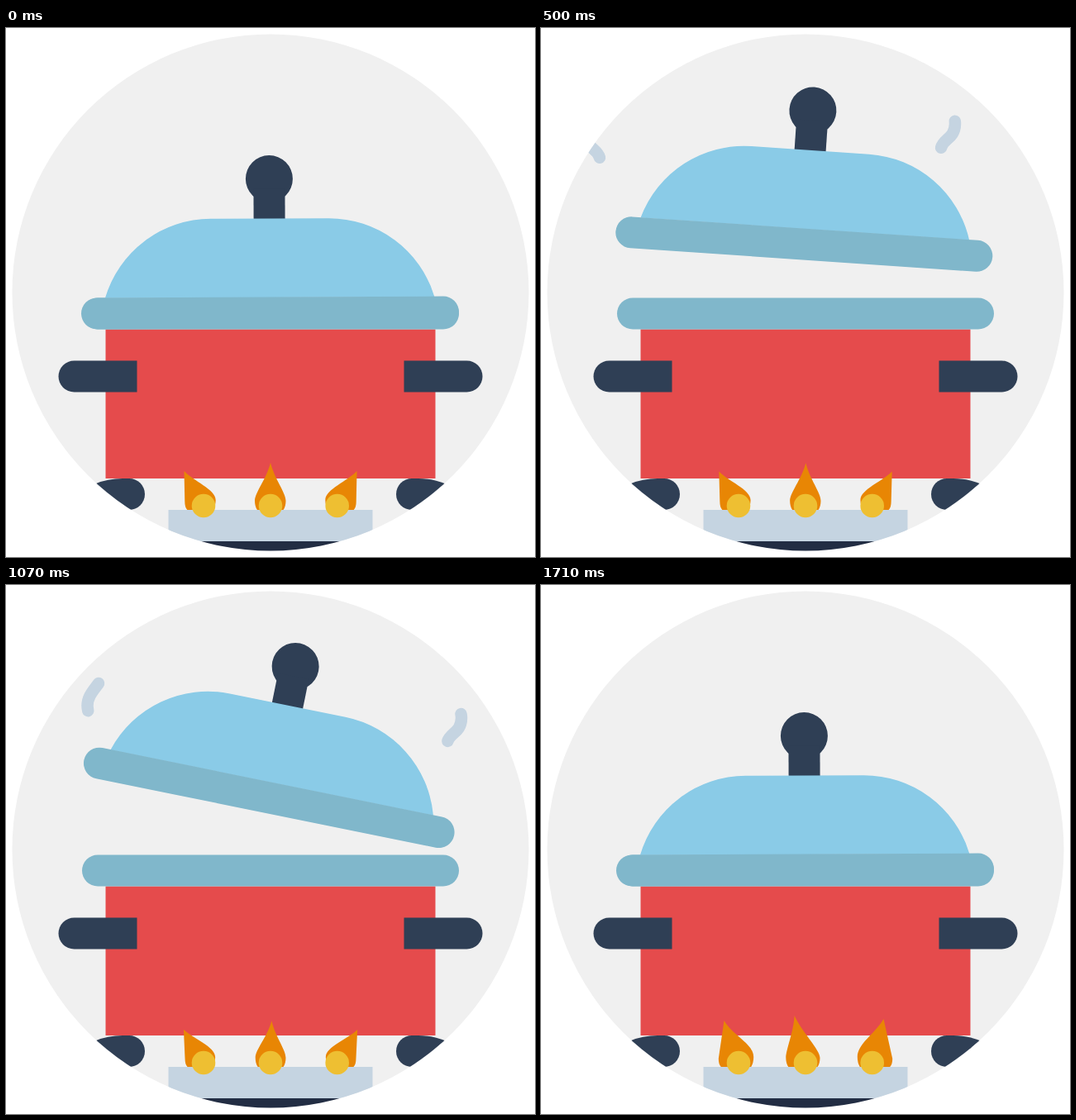
Recreate the animation shown at these times as an HTML page. Size 640x640 px, loop 1.78 s.

```html
<!DOCTYPE html>
<html lang="en">
<head>
<meta charset="utf-8">
<title>Boiling pot</title>
<style>
  html, body { margin: 0; height: 100%; overflow: hidden; background: #fff; }
  svg { display: block; width: 100vw; height: 100vh; }
  .navy { fill: #2f3f55; }
  .rim { fill: #80b7cb; }
  .flame { fill: #e88604; }
  .steam { fill: none; stroke: #c5d4e1; stroke-width: 14.5; stroke-linecap: round; }
</style>
</head>
<body>
<svg viewBox="0 0 640 640">
  <defs>
    <clipPath id="disc"><circle cx="320" cy="320" r="312.5"/></clipPath>
    <g id="side" class="navy">
      <path d="M158.5 402.5H82.5a19 19 0 0 0 0 38H158.5Z"/>
      <path d="M149 545H141Q123 545 108 551.5L95 583H149a19 19 0 0 0 0-38Z"/>
    </g>
  </defs>
  <g clip-path="url(#disc)">
    <rect width="640" height="640" fill="#f0f0f0"/>
    <g id="steam"></g>
    <path fill="#e54b4c" d="M120.5 364.5H519.5V545H120.5Z"/>
    <use href="#side"/>
    <use href="#side" transform="matrix(-1 0 0 1 640 0)"/>
    <rect class="rim" x="92" y="326.5" width="456" height="38" rx="19"/>
    <g id="lid">
      <circle class="navy" cx="-.4" cy="-162" r="28.5"/>
      <path class="navy" d="M-19.4-150H18.6V-113H-19.4Z"/>
      <path fill="#8acbe7" d="M-199.5-18.5A133.5 133.5 0 0 1-71.5-114H71A133.5 133.5 0 0 1 199-18.5Z"/>
      <rect class="rim" x="-228.5" y="-19" width="457" height="38" rx="19"/>
    </g>
    <path fill="#c5d4e1" d="M196.5 583H443.5V621H196.5Z"/>
    <path fill="#222d43" d="M196 621H444V640H196Z"/>
    <path id="left" class="flame"/>
    <path id="middle" class="flame"/>
    <path id="right" class="flame" transform="matrix(-1 0 0 1 640 0)"/>
    <g fill="#eebf32">
      <circle cx="239" cy="578" r="14.3"/>
      <circle cx="320" cy="578" r="14.3"/>
      <circle cx="400.7" cy="578" r="14.3"/>
    </g>
  </g>
</svg>
<script>
const LOOP = 1780, FPS = 14;
const $ = id => document.getElementById(id);

// Key points as [step, value], eased in between.
const lift = [[0, 0], [4, 88.5], [9, 80], [16, 87.5], [24, 0]];
const tilt = [[0, -.25], [4, -5.8], [9, 9], [12, 9], [17, 12.8], [21, -2.7], [24, -.25]];
const flicker = [[0, 0], [4, .15], [12, -.45], [17, 0], [21, -1], [24, 1]];

const wave = 'M488.5 165Q483 156 483.5 149C484 133 500.5 136 501 116C501 105 494 98 487.5 89';
const wisps = [
  ['', 0],
  ['translate(50 45)', 7.9],
  ['matrix(-1 0 0 1 555 12)', 0],
  ['matrix(-1 0 0 1 599.5 30)', 5.3]
].map(([transform, delay]) => {
  const path = document.createElementNS('http://www.w3.org/2000/svg', 'path');
  const attrs = { d: wave, class: 'steam', pathLength: 100, transform };
  for (const name in attrs) path.setAttribute(name, attrs[name]);
  $('steam').append(path);
  return { path, delay };
});

const percent = v => 100 * Math.min(1, Math.max(0, v));

function at(keys, step) {
  const i = Math.max(1, keys.findIndex(key => key[0] >= step));
  const [s0, v0] = keys[i - 1], [s1, v1] = keys[i];
  return v0 + (v1 - v0) * (1 - Math.cos(Math.PI * (step - s0) / (s1 - s0))) / 2;
}

// q runs from -1 (low) to 1 (high)
function sideFlame(x, y, q) {
  const l = 216.3 - 1.5 * q, r = 253.7 + 3.5 * q;
  return `M${x} ${y}C${x + 11} ${y + 12 + 6.5 * q} ${r} ${558 - 3 * q} ${r} 571` +
    `Q${r} 578 ${r - 3} 583H${l + 3}Q${l} 580 ${l} 573Z`;
}

function middleFlame(x, y, q) {
  const l = 301 - 4.7 * q, r = 338.5 - q * q;
  const neck = x + (320 - x) * .3, neckY = y + 20;
  return `M${x} ${y}C${neck - 5} ${neckY} ${l} 562 ${l} 572Q${l} 579 ${l + 3} 583` +
    `H${r - 3}Q${r} 579 ${r} 572C${r} 562 ${neck + 5} ${neckY} ${x} ${y}`;
}

function draw(time) {
  const step = Math.min(24, Math.floor((time % LOOP + 5) * FPS / 1000));

  const up = at(lift, step);
  $('lid').setAttribute('transform',
    `translate(${319.5 - up / 70} ${344.5 - up}) rotate(${at(tilt, step)})`);

  const q = at(flicker, step), bend = q * q;
  $('left').setAttribute('d', sideFlame(215.5 + 4 * q + 2 * bend, 536 - 11 * q + 2 * bend, q));
  $('middle').setAttribute('d', middleFlame(320 - 9.7 * q - 3.7 * bend, 526 - 8 * q + 3 * bend, q));
  $('right').setAttribute('d', sideFlame(215.5 + 5 * q + 5 * bend, 536 - 12 * q + bend, q));

  for (const { path, delay } of wisps) {
    const age = step - delay;
    const head = percent((age - 3.6) / 5), tail = percent((age - 5) / 8.2);
    path.style.display = head > tail ? '' : 'none';
    path.setAttribute('stroke-dasharray', `${head - tail} 300`);
    path.setAttribute('stroke-dashoffset', -tail);
  }
}

function tick() {
  draw(performance.now());
  requestAnimationFrame(tick);
}
tick();
</script>
</body>
</html>
```
